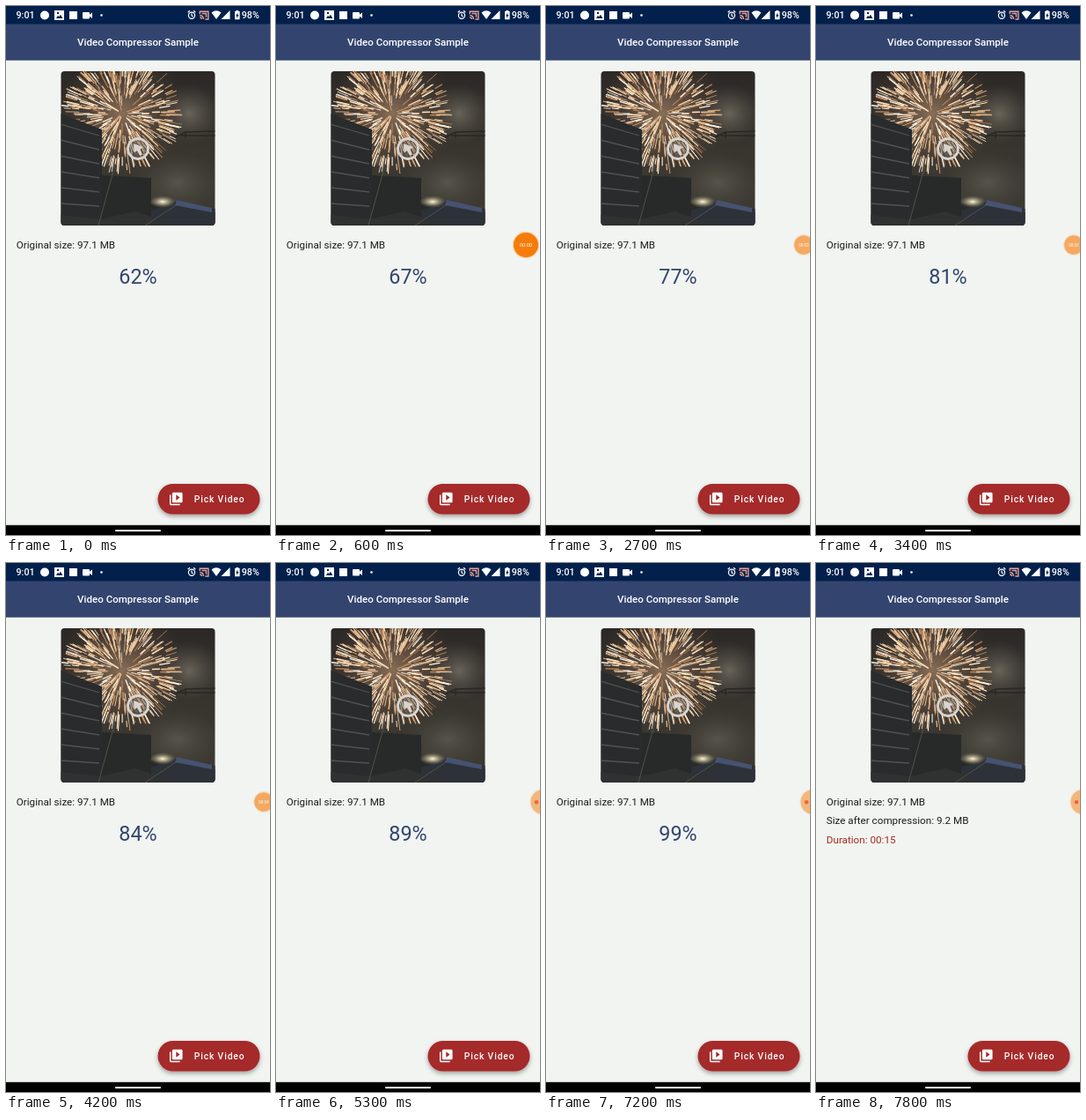
An HTML page that plays this animation: 300 by 600 pixels, repeating every 8 s.

```html
<!DOCTYPE html>
<html lang="en">
<head>
<meta charset="utf-8">
<title>Video Compressor Sample</title>
<style>
  html, body { margin: 0; width: 100%; height: 100%; overflow: hidden; background: #f1f4f1; }
  svg { display: block; width: 300px; height: 600px; font-family: Roboto, sans-serif; }
  .body { font-size: 11.68px; }
  .status { font-size: 10.7px; font-weight: 500; }
</style>
</head>
<body>
<svg viewBox="0 0 300 600">
  <defs>
    <clipPath id="frame"><rect x="62.5" y="74" width="175" height="175" rx="4"/></clipPath>
    <linearGradient id="sky" x1="0" y1="0" x2="0" y2="1">
      <stop offset="0" stop-color="#2b2826"/><stop offset=".5" stop-color="#38352f"/><stop offset="1" stop-color="#3d3b33"/>
    </linearGradient>
    <radialGradient id="glow">
      <stop offset="0" stop-color="#a58467" stop-opacity=".75"/><stop offset=".5" stop-color="#6b5444" stop-opacity=".55"/><stop offset="1" stop-color="#453a32" stop-opacity="0"/>
    </radialGradient>
    <radialGradient id="smoke">
      <stop offset="0" stop-color="#7b766a" stop-opacity=".75"/><stop offset="1" stop-color="#5c574c" stop-opacity="0"/>
    </radialGradient>
    <radialGradient id="flare">
      <stop offset="0" stop-color="#fff8dc"/><stop offset=".35" stop-color="#d8cda8" stop-opacity=".7"/><stop offset="1" stop-color="#8a8468" stop-opacity="0"/>
    </radialGradient>
    <filter id="shadow" x="-20%" y="-40%" width="140%" height="200%">
      <feDropShadow dx="0" dy="2.5" stdDeviation="2.5" flood-color="#000" flood-opacity=".35"/>
    </filter>
  </defs>

  <rect width="300" height="600" fill="#f1f4f1"/>
  <rect y="20" width="300" height="41.7" fill="#33456f"/>
  <rect width="300" height="20.5" fill="#02204b"/>
  <rect y="588.8" width="300" height="11.2" fill="#000"/>
  <rect x="124" y="594" width="52" height="2" rx="1" fill="#fff"/>

  <g fill="#fff">
    <text class="status" x="11.5" y="14">9:01</text>
    <circle cx="44" cy="10.5" r="5"/>
    <path fill-rule="evenodd" d="M55 5h11v11h-11zM57 14h7.4l-2.4-4.2-1.8 2.4-1.2-1.4zM58 7v2h2v-2z"/>
    <rect x="72" y="6" width="9" height="9"/>
    <path d="M88 7h6q1 0 1 1v1.8l3-2.3v6.5l-3-2.3v1.8q0 1-1 1h-6q-1 0-1-1v-5.5q0-1 1-1z"/>
    <circle cx="108.500" cy="10.500" r="1.300"/>
    <g fill="none" stroke="#fff" stroke-width="1.200">
      <circle cx="211" cy="10.700" r="3.600"/>
      <path d="M211 8.500v2.500l1.700 1M206.700 7.200l2.200-2M215.300 7.200l-2.200-2"/>
    </g>
    <path d="M220.300 9v-2.800h9.600v8.800h-3.500M220.300 10.500q4 .3 4.200 4.500M220.300 12.700q2 .2 2.100 2.300M222.500 8.500h5v4.200" fill="none" stroke="#efa08f" stroke-width="1.400"/>
    <path d="M233.500 7.500q5.500-4.500 11 0l-5.500 7.500z"/>
    <path d="M254.500 5v10h-10z"/>
    <path d="M261.300 5h3v1h1.300v9.300h-5.600v-9.300h1.300z"/>
    <path fill="#02204b" d="M263.300 7.500l-2.200 4h1.300v2.500l2.100-4h-1.200z"/>
    <text class="status" x="267.800" y="14">98%</text>
    <text x="150" y="45.200" font-size="11.550" font-weight="500" text-anchor="middle">Video Compressor Sample</text>
  </g>

  <g clip-path="url(#frame)">
    <rect x="62" y="74" width="176" height="175" fill="url(#sky)"/>
    <ellipse cx="208" cy="122" rx="38" ry="34" fill="url(#smoke)"/>
    <ellipse cx="195" cy="200" rx="50" ry="34" fill="url(#smoke)" opacity=".6"/>
    <circle cx="132" cy="122" r="74" fill="url(#glow)"/>
    <g id="burst" stroke-linecap="round"></g>
    <path d="M192 149l12-6 34-1M199 147h39M204 144v6" fill="none" stroke="#292725" stroke-width="1.500"/>
    <path d="M108 192l57 3v29l73 10v15h-130z" fill="#272a29"/>
    <path d="M165 232l30-11 43 9v19h-73z" fill="#2d3138"/>
    <path d="M194 220l40 9v5l-42-8z" fill="#465270"/>
    <ellipse cx="178" cy="222" rx="15" ry="7" fill="url(#flare)"/>
    <path d="M62 122l47 18v109h-47z" fill="#292b2c"/>
    <g id="floors" stroke="#505352" stroke-width="1.300"></g>
    <path d="M62 237l45 5 40-9 45 16h-130z" fill="#2f3231"/>
    <path d="M124 180l-19 69M196 224l-38 25" stroke="#5b5b55" stroke-width=".8"/>
    <circle cx="150" cy="162" r="11.500" fill="#625b54" fill-opacity=".45" stroke="#d8d4cf" stroke-width="2.800"/>
    <path d="M145 156l11 4-3.500 2.500 2.500 6-3 1-3-5.500-3.500 2.500z" fill="#d8d4cf"/>
  </g>

  <text class="body" x="11.800" y="274.500" fill="#1c1c1c">Original size: 97.1 MB</text>
  <text id="percent" x="150" y="314.700" font-size="23.400" text-anchor="middle" fill="#33456f"></text>
  <g id="result" class="body">
    <text x="11.800" y="296.400" fill="#1c1c1c">Size after compression: 9.2 MB</text>
    <text x="11.800" y="318" fill="#a52a1e">Duration: 00:15</text>
  </g>

  <rect x="172.500" y="542" width="116" height="34.500" rx="17.250" fill="#a52a2a" filter="url(#shadow)"/>
  <path transform="translate(184.500 550.200) scale(.73)" fill="#fff" d="M4 6H2v14c0 1.100.9 2 2 2h14v-2H4zM20 2H8c-1.100 0-2 .9-2 2v12c0 1.100.9 2 2 2h12c1.100 0 2-.9 2-2V4c0-1.100-.9-2-2-2zm-8 12.500v-9l6 4.500z"/>
  <text x="213.700" y="563" font-size="10.220" font-weight="500" letter-spacing=".91" fill="#fff">Pick Video</text>

  <g id="bubble">
    <circle id="disc" cy="271" fill="#f57c0a" stroke="#fbd3ac" stroke-width="1.200"/>
    <text id="timer" y="273.100" text-anchor="middle" fill="#fff"></text>
  </g>
  <circle id="dot" cx="296" cy="271.300" r="2.300" fill="#f0643f"/>
</svg>
<script>
const $ = id => document.getElementById(id);
const LOOP = 8000, STEP = 100;

function add(parent, tag, attrs) {
  const el = document.createElementNS('http://www.w3.org/2000/svg', tag);
  for (const key in attrs) el.setAttribute(key, attrs[key]);
  parent.appendChild(el);
}

function seeded(seed) {
  return () => (seed = seed * 16807 % 2147483647) / 2147483647;
}

function buildPhoto() {
  const rand = seeded(4711);
  const colors = ['#fff6e4', '#fbe3bf', '#f2cda0', '#d9a677', '#ab7c58'];
  for (let i = 0; i < 460; i++) {
    const angle = rand() * Math.PI * 2;
    const end = 12 + 57 * Math.sqrt(rand());
    const start = Math.max(4, end - 6 - rand() * 12);
    const c = Math.cos(angle), s = Math.sin(angle);
    add($('burst'), 'line', {
      x1: 132 + c * start, y1: 122 + s * start, x2: 132 + c * end, y2: 122 + s * end,
      stroke: colors[Math.floor(rand() * colors.length)], 'stroke-width': 0.7 + rand() * 0.8
    });
  }
  for (let i = 0; i < 6; i++) {
    const y = 134 + i * 18;
    add($('floors'), 'line', { x1: 62, y1: y, x2: 106, y2: y + 13 - i * 2 });
  }
}

// Moments at which the percentage rises by one, starting from 62.
const ticks = [100, 200, 400, 500, 600, 800, 1000];
for (let t = 1200; t <= 3400; t += 200) ticks.push(t);
ticks.push(3700, 4000);
for (let t = 4200; t <= 6600; t += 200) ticks.push(t);
ticks.push(6900, 7100, 7200);

const mix = (a, b, p) => a + (b - a) * p;
function ease(t, from, to) {
  const p = Math.min(1, Math.max(0, (t - from) / (to - from)));
  return p * p * (3 - 2 * p);
}

function render(t) {
  const done = t >= 7700;
  $('percent').textContent = done ? '' : 62 + ticks.filter(x => x <= t).length + '%';
  $('result').style.display = done ? '' : 'none';

  const enter = ease(t, 100, 500), shrink = ease(t, 1800, 2300), dock = ease(t, 5000, 5300);
  const x = mix(mix(mix(317, 284, enter), 293, shrink), 303.5, dock);
  const r = mix(mix(14.6, 11.4, shrink), 14.6, dock);
  $('disc').setAttribute('cx', x);
  $('disc').setAttribute('r', r);
  $('bubble').setAttribute('opacity', mix(mix(1, 0.62, shrink), 0.5, dock));
  $('timer').setAttribute('x', x);
  $('timer').setAttribute('font-size', mix(5.7, 4.6, shrink));
  $('timer').setAttribute('opacity', 1 - dock);
  $('timer').textContent = '00:0' + Math.min(4, Math.max(0, Math.floor((t - 200) / 1000)));
  $('dot').setAttribute('opacity', dock);
}

buildPhoto();
const began = performance.now();
function loop() {
  const t = (performance.now() - began) % LOOP;
  render(Math.floor(t / STEP) * STEP);
  requestAnimationFrame(loop);
}
loop();
</script>
</body>
</html>
```
